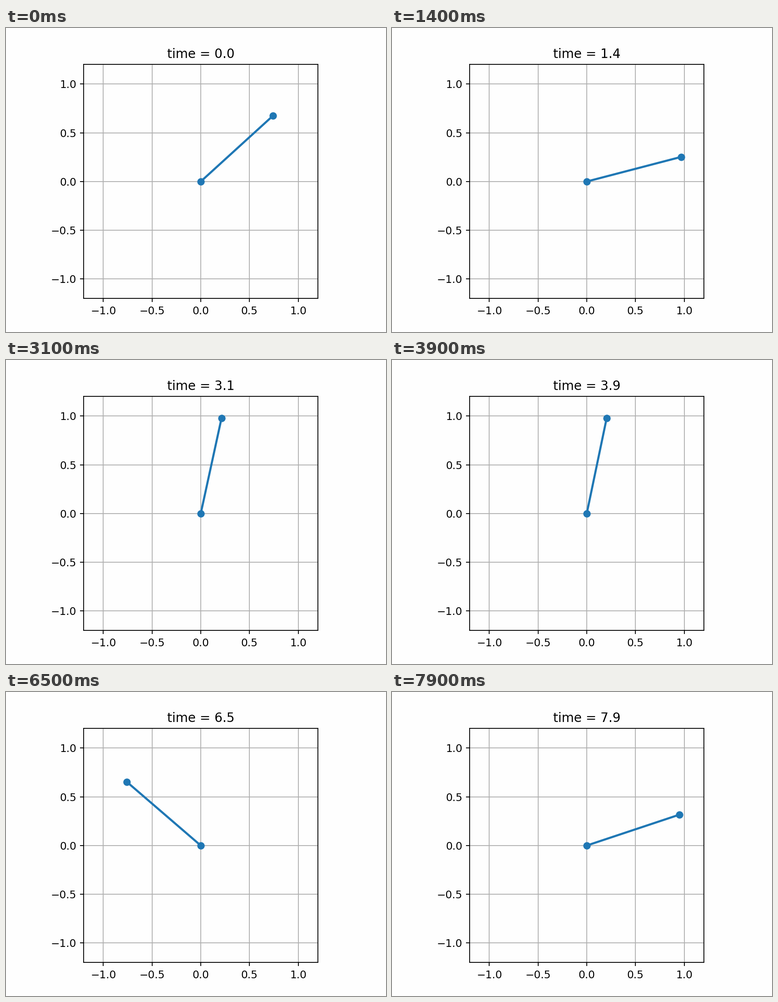
Animation, 837 px wide and 669 px high, one loop 8000 ms. Source, as a matplotlib script:

```python
import numpy as np
import matplotlib.pyplot as plt
from matplotlib.animation import FuncAnimation

WIDTH, HEIGHT, DPI = 837, 669, 167.25
FRAMES, STEP_MS = 80, 100

# Key poses of the turning rod: time in seconds, unwrapped angle in degrees
KEY_T = np.array([0.0, 1.4, 3.1, 3.9, 5.1, 6.5, 7.9])
KEY_A = np.array([42.3, 734.6, 1517.7, 1878.2, 2352.8, 3019.3, 3618.4])
SPEED = np.gradient(KEY_A, KEY_T)


def angle(t):
    """Cubic Hermite curve through the key poses, in radians."""
    i = min(np.searchsorted(KEY_T, t, side="right") - 1, len(KEY_T) - 2)
    h = KEY_T[i + 1] - KEY_T[i]
    s = (t - KEY_T[i]) / h
    a = ((1 + 2 * s) * (1 - s) ** 2 * KEY_A[i]
         + s * (1 - s) ** 2 * h * SPEED[i]
         + s * s * (3 - 2 * s) * KEY_A[i + 1]
         + s * s * (s - 1) * h * SPEED[i + 1])
    return np.radians(a)


plt.rcParams["font.family"] = "DejaVu Sans"
fig = plt.figure(figsize=((WIDTH + 1e-3) / DPI, (HEIGHT + 1e-3) / DPI),
                 dpi=DPI, facecolor="#fefefe")
ax = fig.add_subplot(facecolor="#fefefe")
ax.set_aspect("equal")
ax.set(xlim=(-1.2, 1.2), ylim=(-1.2, 1.2))
ticks = np.arange(-1, 1.1, 0.5)
ax.set_xticks(ticks)
ax.set_yticks(ticks)
ax.grid()

rod, = ax.plot([], [], "o-", color="C0", lw=2, ms=6)
title = ax.set_title("time = 0.0")


def update(n):
    t = n * STEP_MS / 1000
    a = angle(t)
    rod.set_data([0, np.cos(a)], [0, np.sin(a)])
    title.set_text(f"time = {t:.1f}")
    return rod, title


anim = FuncAnimation(fig, update, frames=FRAMES, interval=STEP_MS,
                     repeat=True, repeat_delay=0, blit=False)
plt.show()
```
